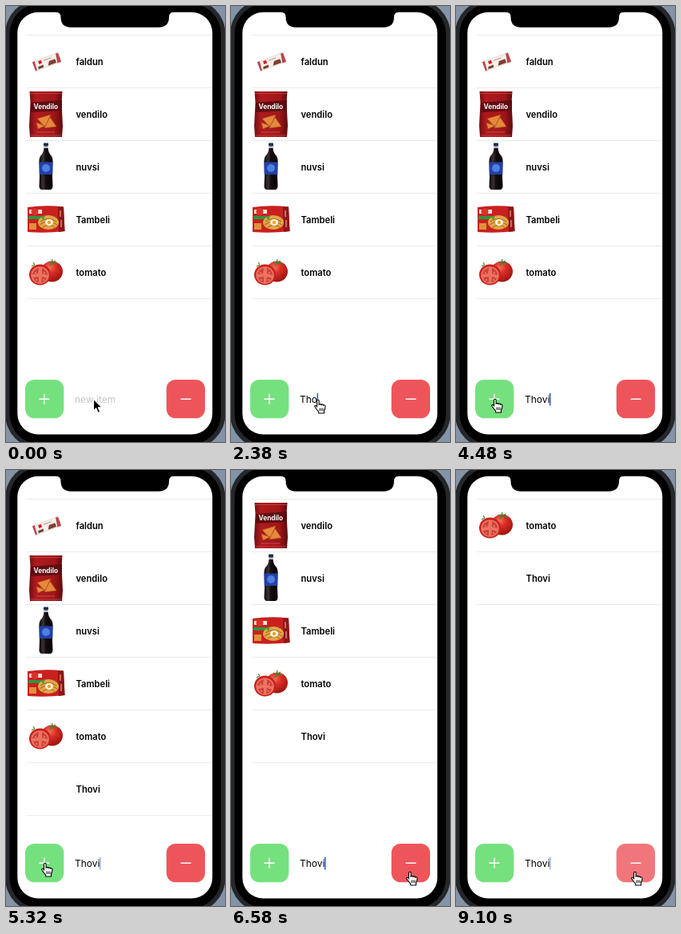
An HTML page that plays this animation: 274x546 px, repeating every 9.17 s.

```html
<!DOCTYPE html>
<html lang="en">
<head>
<meta charset="utf-8">
<title>Shopping list</title>
<style>
  html, body { margin: 0; width: 100%; height: 100%; overflow: hidden; background: #8593a8; }
  svg { display: block; width: 274px; height: 546px; }
  text { font-family: Inter, Roboto, sans-serif; }
  .label { font-size: 11.2px; font-weight: 600; fill: #000; }
  .field { font-size: 12px; }
  .sep { stroke: #ebebed; stroke-width: 1; }
  .icon { stroke: #fff; stroke-width: 1.4; stroke-linecap: round; }
</style>
</head>
<body>
<svg viewBox="0 0 274 546" xmlns="http://www.w3.org/2000/svg">
  <defs>
    <linearGradient id="bag" x2="1">
      <stop offset="0" stop-color="#6f0f12"/><stop offset=".2" stop-color="#b01a1e"/>
      <stop offset=".75" stop-color="#a01519"/><stop offset="1" stop-color="#5c0b0e"/>
    </linearGradient>
    <linearGradient id="cola" x2="1">
      <stop offset="0" stop-color="#0c0808"/><stop offset=".3" stop-color="#3a3030"/>
      <stop offset=".5" stop-color="#130c0c"/><stop offset="1" stop-color="#050404"/>
    </linearGradient>
    <radialGradient id="skin" cx=".4" cy=".3" r=".75">
      <stop offset="0" stop-color="#f4705a"/><stop offset=".4" stop-color="#d92c24"/>
      <stop offset="1" stop-color="#99130f"/>
    </radialGradient>
  </defs>

  <!-- phone -->
  <rect x="-1" y="-8" width="275.500" height="562" rx="43" fill="#25272b"/>
  <rect x="4.500" y="-3" width="264.500" height="552" rx="38"/>
  <rect x="14.300" y="7.700" width="243.900" height="528.800" rx="26" fill="#fff"/>
  <path d="M62 6.500H210V7.700Q204 7.700 204 13.500Q204 26.700 191 26.700H81Q68.500 26.700 68.500 13.500Q68.500 7.700 62 7.700Z"/>

  <!-- list -->
  <path class="sep" d="M26 36.500H258"/>
  <g class="row">
    <g transform="rotate(-20 51 70)">
      <path fill="#f6f0ed" stroke="#d8cbc7" stroke-width=".6" d="M34 64H68V76H34Z"/>
      <path fill="#b8464a" d="M34 64H37L36 76H34ZM65 64H68V76H63Z"/>
      <rect x="41" y="65.500" width="4" height="4" fill="#c5272b"/>
      <path fill="#7d4030" d="M39 72H46L45 75H38ZM54 70H62V75H51Z"/>
      <path stroke="#d98a82" d="M48 67H58"/>
    </g>
    <text class="label" x="87.500" y="73.700">faldun</text>
  </g>
  <g class="row">
    <path fill="url(#bag)" d="M29.500 41L70.500 41L69.500 55L71 84L70 98H30L29 84L30.500 55Z"/>
    <path fill="#5e0d11" d="M31 55L70 52V65L31 67Z"/>
    <path stroke="#c9544f" stroke-width=".7" d="M30 43.500H70M31 96H69"/>
    <text x="34.500" y="62.700" font-size="8.300" font-weight="700" fill="#fff">Vendilo</text>
    <g fill="#e58a3c" stroke="#a84817" stroke-width=".7">
      <path d="M39 75L56 70L49 86Z"/><path d="M55 73L63 85L48 87Z"/><path d="M38 80L49 84L40 88Z"/>
    </g>
    <path stroke="#b9544c" d="M38 92H61"/>
    <text class="label" x="87.500" y="73.700">vendilo</text>
  </g>
  <g class="row">
    <path fill="#b9bcc4" d="M47.500 43H52.500L53 48H47Z"/>
    <path fill="url(#cola)" d="M47.500 46H52.500Q53 52 57 56Q59 59 58.500 66L58 81L58.500 94Q58 98 55 98H45Q42 98 41.500 94L42 81L41.500 66Q41 59 43 56Q47 52 47.500 46Z"/>
    <rect x="47" y="39.500" width="6" height="4" rx="1" fill="#202d4c"/>
    <path fill="#2340a6" d="M41.700 63.500H58.300V79H41.700Z"/>
    <circle cx="50" cy="71" r="5" fill="#4b7fe2"/>
    <text class="label" x="87.500" y="73.700">nuvsi</text>
  </g>
  <g class="row">
    <path fill="#c9201f" d="M27 54Q49 51 72 53.500L73.500 84Q50 87 27 85Z"/>
    <path fill="#8f1517" d="M65 53.500L72 53.500L73.500 84L66 85Z"/>
    <path fill="#efe6d6" d="M29 57H45V62H29Z"/>
    <circle cx="36" cy="59.500" r="4.500" fill="#d9312c"/>
    <path fill="#35923d" d="M28 65H46V69H28Z"/>
    <ellipse cx="53" cy="73" rx="13" ry="9" fill="#dfa746"/>
    <path fill="none" stroke="#a76420" d="M42 76Q52 68 64 76M43 72Q53 65 63 72M46 79Q54 74 61 79"/>
    <ellipse cx="54" cy="73" rx="5" ry="4" fill="#fff6e5"/>
    <circle cx="54" cy="73" r="2.200" fill="#efa128"/>
    <path fill="#559338" d="M44 67L49 64L47 70Z"/>
    <path fill="#e0913a" d="M29 74H38V82H29Z"/>
    <path stroke="#f1cd9a" d="M68 58V66M69 70V79"/>
    <text class="label" x="87.500" y="73.700">Tambeli</text>
  </g>
  <g class="row">
    <ellipse cx="57.500" cy="68.500" rx="13.500" ry="13" fill="url(#skin)"/>
    <path fill="none" stroke="#4d7e2c" stroke-width="1.300" d="M57 58L53 56M57 58L62 55M57 58L64 59M57 58L55 62M57 58L58 53"/>
    <ellipse cx="42.500" cy="72.500" rx="13.500" ry="13" fill="#c9211c"/>
    <ellipse cx="42.500" cy="73" rx="11.300" ry="10.800" fill="#ec7263"/>
    <path fill="#cf4136" d="M41 64Q34 66 33 72L40 71ZM45 64Q52 67 52 73L45 71ZM34 76L41 75V82Q36 82 34 76ZM45 75L51 77Q48 82 44 82Z"/>
    <path stroke="#f6c39e" stroke-width=".8" d="M37 69V71M48 69V71M38 78V80M47 78V80"/>
    <path stroke="#4d7e2c" stroke-width="1.200" d="M32 62L36 60M36 60L34 57"/>
    <text class="label" x="87.500" y="73.700">tomato</text>
  </g>
  <g class="row"><text class="label" x="87.500" y="73.700">Thovi</text></g>

  <!-- input bar -->
  <g id="plus">
    <rect x="24" y="468" width="48.300" height="48.300" rx="11.500" fill="#75e17e"/>
    <path class="icon" d="M42 492.200H54M48 486.200V498.200"/>
  </g>
  <g id="minus">
    <rect x="200.700" y="468" width="48.300" height="48.300" rx="11.500" fill="#ee555b"/>
    <path class="icon" d="M219 492.200H231"/>
  </g>
  <text class="field" id="hint" x="86" y="496.700" fill="#c4c4c6">new item</text>
  <text class="field" id="typed" x="86" y="496.700" fill="#000"></text>
  <rect id="caret" y="485" width="1.500" height="15.500" fill="#2f55d4"/>

  <!-- pointers -->
  <path id="arrow" transform="translate(109 492)" fill="#000" stroke="#fff" stroke-width="1"
    d="M.5 .5V14.500L3.800 11.500L6.200 17.300L8.600 16.300L6.200 10.700H10.500Z"/>
  <g id="hand" stroke="#000" stroke-width="1.100" stroke-linejoin="round">
    <path fill="#fff" d="M4 10V2.200Q4 .8 5.300 .8T6.600 2.200V7Q6.800 5.800 8 5.900Q9.200 6 9.300 7.200Q9.600 6.200 10.700 6.400Q11.800 6.600 11.900 7.800Q12.200 7 13.100 7.200Q14.600 7.500 14.500 9Q14.400 12 13 14.500V17.500H6.200L6 15.300Q3.800 13 1.600 9.800Q.7 8.200 2 7.800Q3.200 7.600 4 9.400"/>
    <path stroke-width=".9" d="M7.500 11V14.500M9.500 11V14.500M11.500 11V14.500"/>
  </g>
</svg>
<script>
  const LOOP = 9170;
  const WORD = "Thovi";
  const KEYS = [2030, 2170, 2380, 2590, 2660];
  const REMOVED = [[6320, 240], [6930, 210], [7410, 140], [8830, 240]];
  const FLASHES = [6270, 6880, 8836];
  const ADDED = 4760;
  const BLINK = 1022;
  const MOVES = [[3780, 640, -60, -1], [5400, 600, 175, 11]];

  const $ = id => document.getElementById(id);
  const clamp = v => Math.max(0, Math.min(1, v));
  const progress = (t, start, length) => clamp((t - start) / length);
  const ease = u => u * u * (3 - 2 * u);
  const show = (el, on) => el.setAttribute("opacity", +on);

  const rows = [...document.querySelectorAll(".row")];
  for (const row of rows) {
    const line = document.createElementNS("http://www.w3.org/2000/svg", "path");
    line.setAttribute("class", "sep");
    line.setAttribute("d", "M26 102.500H258");
    row.append(line);
  }

  function drawList(t) {
    const gone = REMOVED.map(([start, length]) => ease(progress(t, start, length)));
    let slot = 0;
    rows.forEach((row, i) => {
      const out = gone[i] || 0;
      row.setAttribute("transform", `translate(0 ${slot * 66})`);
      show(row, i === rows.length - 1 ? ease(progress(t, ADDED, 280)) : 1 - out);
      slot += 1 - out;
    });
  }

  function drawButtons(t) {
    const swell = t < 4620 ? 0 : 1 - ease(progress(t, 4760, 280));
    $("plus").setAttribute("transform",
      `translate(48 492) scale(${1 + 0.3 * swell}) translate(-48 -492)`);
    const dip = FLASHES.reduce((sum, start) => sum + Math.sin(Math.PI * progress(t, start, 300)), 0);
    show($("minus"), 1 - 0.55 * dip);
  }

  function caretAlpha(t) {
    if (t < 1470) return 0;
    if (t < 2800) return 1;
    const phase = (t - 2860 + BLINK) % BLINK;
    return 1 - progress(phase, 0, 210) + progress(phase, 340, 150);
  }

  function drawField(t) {
    const count = KEYS.filter(k => t >= k).length;
    const typed = $("typed");
    typed.textContent = WORD.slice(0, count);
    show($("hint"), !count);
    const width = count ? typed.getComputedTextLength() : 0;
    $("caret").setAttribute("x", 86 + width - 0.5);
    show($("caret"), caretAlpha(t));
  }

  function drawPointer(t) {
    let x = 103.5, y = 492.5;
    for (const [start, length, dx, dy] of MOVES) {
      const u = ease(progress(t, start, length));
      x += dx * u;
      y += dy * u;
    }
    $("hand").setAttribute("transform", `translate(${x} ${y})`);
    show($("arrow"), t < 1120);
    show($("hand"), t >= 1120);
  }

  const origin = performance.now();
  function frame() {
    const t = (performance.now() - origin) % LOOP;
    drawList(t);
    drawButtons(t);
    drawField(t);
    drawPointer(t);
    requestAnimationFrame(frame);
  }
  frame();
</script>
</body>
</html>
```
